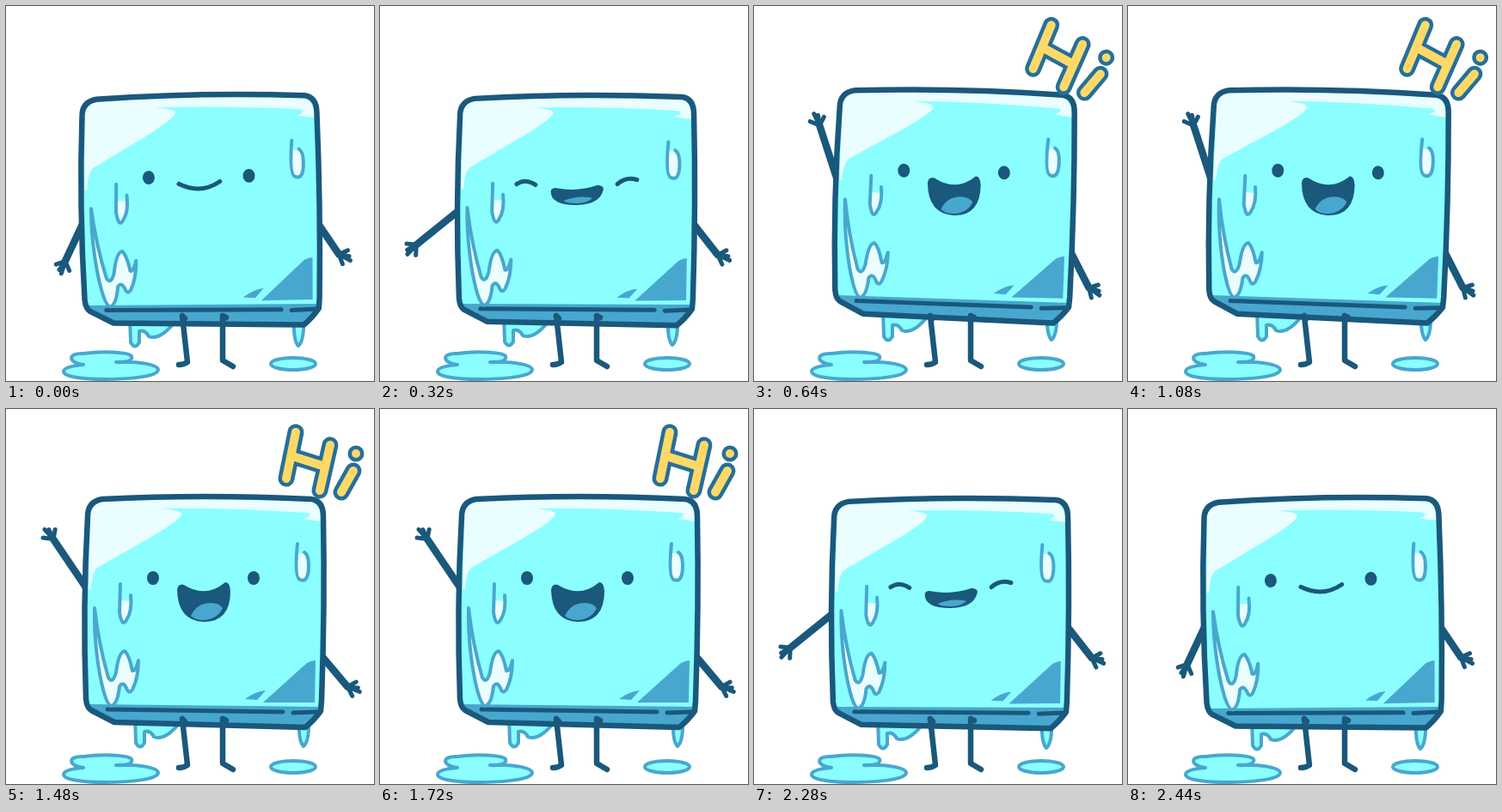
Animation of 428 by 437 pixels, one loop 2.76 s. Source, as an HTML page:

```html
<!DOCTYPE html>
<html lang="en">
<head>
<meta charset="utf-8">
<title>Waving ice cube</title>
<style>
  html, body { margin: 0; height: 100%; overflow: hidden; background: #fff; }
  svg { display: block; width: 100vw; height: 100vh; }
  path, ellipse, use { stroke-linecap: round; stroke-linejoin: round; }
  .ink { fill: none; stroke: #1a587c; stroke-width: 5; }
  .dark { fill: #1a587c; }
  .mid { fill: #48a7ce; }
  .white { fill: #eafdff; }
  .wet { fill: #8bffff; stroke: #48a7ce; stroke-width: 4; }
  .line { fill: none; stroke: #48a7ce; stroke-width: 4; }
  .arm { stroke-width: 8.5; }
  .thick { stroke-width: 6.5; }
</style>
</head>
<body>
<svg viewBox="0 0 428 437">
  <defs>
    <path id="hand" d="M0 0L-9 -8M0 0L-2 -15M0 0L8 -8M-3 -4L4 -5M0 0L2 -12"/>
    <path id="letters" d="M337 27L326 81M377 42L365 95M333 55L371 67M404 72L390 97M407 52h0"/>
    <path id="outline" d="M95 125Q95 108 112 105Q230 99 355 105Q369 107 369 125Q371 230 367 340L366 352Q358 363 348 371L126 365L99 351Q94 348 93 338Q89 230 95 125Z"/>
  </defs>

  <path class="wet" d="M90 418C72 416 71 404 90 405C110 402 142 403 146 408C148 413 140 416 128 415C156 414 177 418 177 424C176 433 135 435 115 435C90 435 67 432 67 426C67 421 78 419 90 418Z"/>
  <ellipse class="wet" cx="334" cy="417" rx="26" ry="7"/>

  <g id="drips" class="wet">
    <path d="M150 358L151 389Q156 398 161 389L161 376Q168 374 172 382Q184 387 200 368V358Z"/>
    <path d="M341 362Q340 387 346 393Q353 387 352 362Z"/>
  </g>

  <g id="left" class="ink"><path class="arm"/><use href="#hand"/></g>
  <g id="right" class="ink"><path class="arm"/><use href="#hand"/></g>

  <g id="body">
    <use href="#outline" fill="#8bffff"/>
    <path class="white" d="M96 210L98 122Q99 107 115 107Q230 102 352 107Q366 109 367 131L346 128Q358 123 350 121Q260 115 180 116Q206 118 204 123Q200 132 155 157L108 184Q100 188 99 210Z"/>
    <path class="mid" d="M360 293Q356 293 350 296L299 342H359ZM278 338Q290 329 302 328L292 339Z"/>
    <path class="mid" d="M96 344L366 347L365 354L348 371L126 365L100 352Z"/>
    <path class="ink" d="M118 350L322 353M334 354L362 353"/>
    <path class="white" d="M132 223L145 224Q145 239 139 247Q133 251 131 239Z"/>
    <path class="line" d="M133 204L132 237Q135 255 140 246Q147 236 145 217"/>
    <path class="white" d="M337 168H347Q352 170 352 182Q352 203 342 199Q337 196 337 168Z"/>
    <path class="line" d="M339 157Q335 197 342 199Q352 203 352 182Q352 170 347 167"/>
    <path class="line" style="fill:#eafdff" d="M103 232C102 270 108 308 113 327Q118 346 123 346Q130 343 132 323Q136 317 140 325Q143 333 147 327Q154 313 154 293Q151 306 147 305Q143 286 138 282Q131 283 128 307Q124 321 119 313Q108 275 103 232Z"/>
    <use href="#outline" class="ink thick"/>

    <g id="eyes" class="dark">
      <ellipse cx="171" cy="197" rx="7" ry="8"/>
      <ellipse cx="288" cy="197" rx="7" ry="8"/>
    </g>
    <path id="smile" class="ink" d="M206 205Q231 218 254 203"/>
    <g id="grin">
      <path class="ink" d="M161 205Q171 198 183 206M279 206Q289 197 302 201"/>
      <path class="dark" d="M201 213Q203 209 208 210Q232 215 256 207Q265 208 262 214Q258 229 232 230Q200 230 201 213Z"/>
      <path class="mid" d="M216 225Q232 218 250 222Q244 228 232 228Q220 228 216 225Z"/>
    </g>
    <g id="laugh">
      <path class="dark" d="M199 211Q200 203 207 205Q232 221 255 202Q260 201 261 212Q261 248 230 248Q200 247 199 211Z"/>
      <path class="mid" d="M215 241Q222 226 238 226Q248 226 252 232Q246 245 230 246Q220 246 215 241Z"/>
    </g>
  </g>

  <path class="ink thick" d="M205 361L211 415Q207 418 201 418M205 361L208 364M252 361L252 413L264 420M252 361L256 363"/>

  <g id="hi" fill="none" role="img" aria-label="Hi">
    <use href="#letters" stroke="#256f9b" stroke-width="19"/>
    <use href="#letters" stroke="#ffd968" stroke-width="10"/>
  </g>
</svg>
<script>
const $ = id => document.getElementById(id);

// corners: shift of top-left, top-right and bottom-left; arms: x, y, angle, length
const REST = { corners: [-7, 4, -8, -1, -1, 5], drips: [-6, 3], left: [90, 252, -155, 50], right: [362, 252, 146, 45], tilt: [0], face: "smile" };
const GRIN = { corners: [-2, 3, -4, 1, -1, 3], drips: [-6, 2], left: [92, 238, -129, 64], right: [367, 257, 142, 42], tilt: [0], face: "grin" };
const OUT = { corners: [-3, 3, -3, 1, 0, 3], drips: [-2, 2], left: [92, 213, -50, 68], right: [368, 287, 136, 45], tilt: [-8], face: "laugh" };
const MID = { corners: [0, 0, 0, 0, 0, 0], drips: [0, 0], left: [93, 208, -34, 68], right: [369, 290, 140, 44], tilt: [0], face: "laugh" };
const UP = { corners: [5, -7, 4, -1, 1, -7], drips: [0, -4], left: [97, 203, -18, 67], right: [370, 290, 153, 43], tilt: [11], face: "laugh" };

function blend(a, b, k) {
  const pose = { face: b.face };
  for (const key of ["corners", "drips", "left", "right", "tilt"])
    pose[key] = a[key].map((v, i) => v + (b[key][i] - v) * k);
  return pose;
}

// start time, pose, size of the greeting
const steps = [
  [0, REST, 0], [200, blend(REST, GRIN, 0.4), 0], [240, blend(REST, GRIN, 0.8), 0], [320, GRIN, 0],
  [400, OUT, 0], [480, MID, 0.7], [560, UP, 1.2], [640, UP, 1]
];
const wave = [MID, OUT, OUT, MID, UP, UP];
for (let i = 0; i < 18; i++) steps.push([760 + i * 80, wave[i % 6], 1]);
steps.push([2280, GRIN, 0], [2360, blend(GRIN, REST, 0.6), 0], [2440, REST, 0]);

function drawArm(id, [x, y, angle, length], handTurn) {
  const [arm, hand] = $(id).children;
  $(id).setAttribute("transform", `translate(${x} ${y}) rotate(${angle})`);
  arm.setAttribute("d", `M0 6V${-length}`);
  hand.setAttribute("transform", `translate(0 ${-length})` + handTurn);
}

function bodyMatrix([lx, ly, rx, ry, bx, by]) {
  const a = (rx - lx) / 273, b = (ry - ly) / 273;
  const c = (bx - lx) / 250, d = (by - ly) / 250;
  return `matrix(${[1 + a, b, c, 1 + d, lx - 95 * a - 106 * c, ly - 95 * b - 106 * d]})`;
}

function show(id, on) {
  $(id).setAttribute("visibility", on ? "visible" : "hidden");
}

function draw(now) {
  const time = now % 2760;
  const [, pose, size] = steps.findLast(step => step[0] <= time);
  $("body").setAttribute("transform", bodyMatrix(pose.corners));
  $("drips").setAttribute("transform", `translate(${pose.drips})`);
  drawArm("left", pose.left, "");
  drawArm("right", pose.right, " rotate(-35) scale(-1 1)");
  for (const face of ["smile", "grin", "laugh"]) show(face, face === pose.face);
  show("eyes", pose.face !== "grin");
  show("hi", size > 0);
  $("hi").setAttribute("transform", `translate(366 70) rotate(${pose.tilt}) scale(${size}) translate(-366 -70)`);
}

const start = performance.now();
function tick() {
  draw(performance.now() - start);
  requestAnimationFrame(tick);
}
tick();
</script>
</body>
</html>
```
